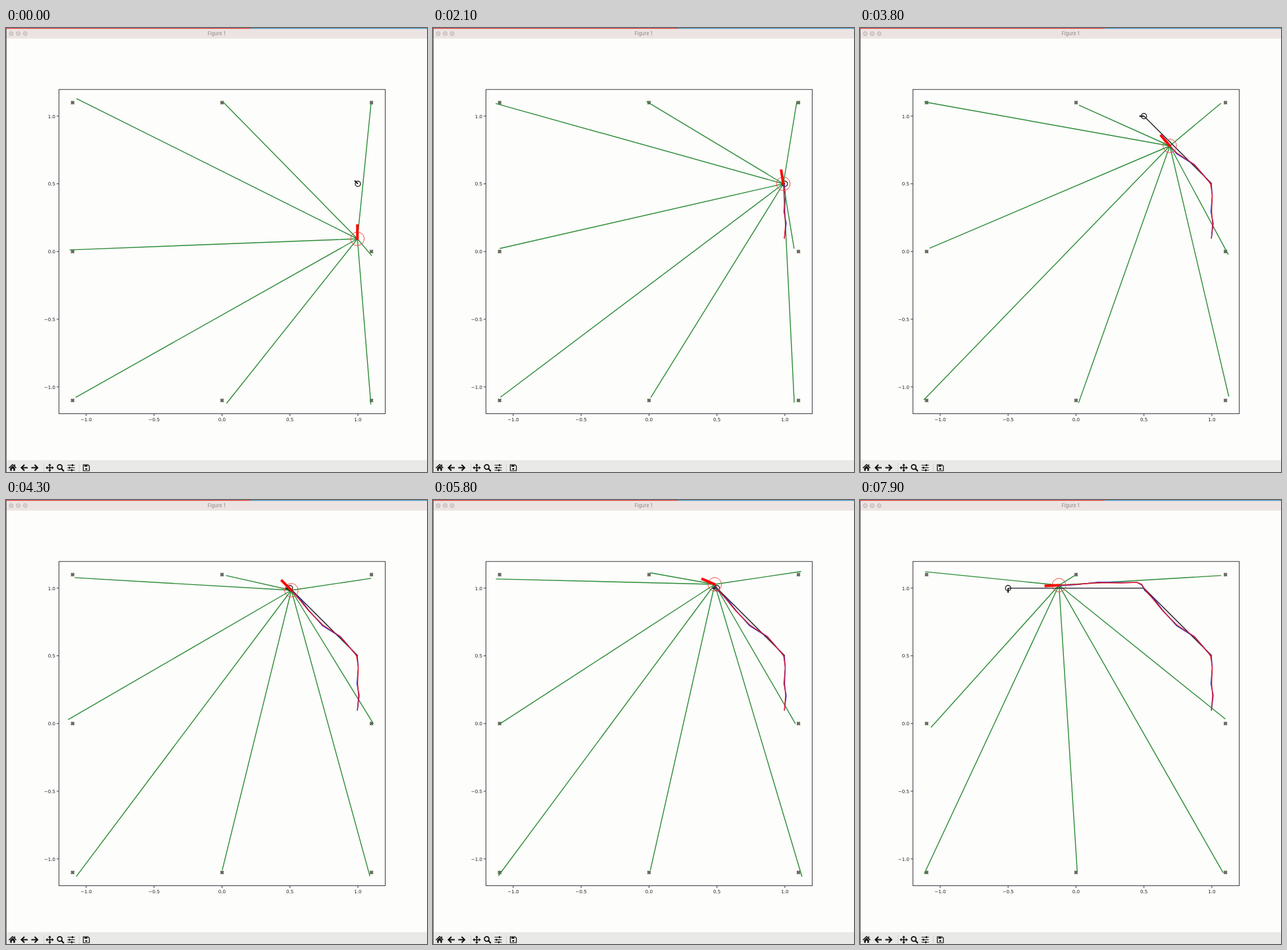
Animation of 640x674 px, one loop 8000 ms. Source, as an HTML page:

```html
<!DOCTYPE html>
<html lang="en">
<head>
<meta charset="utf-8">
<title>Figure 1</title>
<style>
  html, body { margin: 0; width: 100%; height: 100%; overflow: hidden; background: #fdfdfb; }
  svg { display: block; width: 640px; height: 674px; }
  text { font-family: "DejaVu Sans", sans-serif; font-size: 7.1px; fill: #222226; }
  .title { font-family: Inter, sans-serif; font-size: 7.4px; fill: #8b8684; text-anchor: middle; }
  .line { fill: none; stroke-linejoin: round; }
  .icon { fill: none; stroke: #111; stroke-width: 1.8; }
  .solid { fill: #111; stroke: none; }
</style>
</head>
<body>
<svg viewBox="0 0 640 674">
  <rect width="640" height="674" fill="#fdfdfb"/>
  <rect width="640" height="16" fill="#ece4e2"/>
  <rect width="372" height="1.2" fill="#e5403c"/>
  <rect x="372" width="268" height="1.2" fill="#4598c4"/>
  <g fill="#d9d2d0" stroke="#b2abaa" stroke-width=".8">
    <circle cx="8" cy="8.5" r="3"/><circle cx="18.5" cy="8.5" r="3"/><circle cx="29.3" cy="8.5" r="3"/>
  </g>
  <text class="title" x="320" y="10.8">Figure 1</text>

  <rect y="656" width="640" height="18" fill="#e9e9e7"/>
  <path d="M57.5 661V674M111.5 661V674" stroke="#d4d4d2"/>
  <g class="icon">
    <path d="M4.5 668L10 662.7L15.5 668M13.3 662.5V665" stroke-width="1.5"/>
    <path class="solid" d="M6.3 668L10 664.6L13.7 668V672.3H11.2V669H8.8V672.3H6.3Z"/>
    <path d="M33 667.5H23.5M28 663L23.5 667.5L28 672" stroke-width="2.1"/>
    <path d="M38.5 667.5H48M43.5 663L48 667.5L43.5 672" stroke-width="2.1"/>
    <path d="M61.5 667.5H71.5M66.5 662.5V672.5" stroke-width="1.5"/>
    <path class="solid" d="M66.5 661.3l2.4 2.9h-4.8zM66.5 673.7l2.4-2.9h-4.8zM60.3 667.5l2.9-2.4v4.8zM72.7 667.5l-2.9-2.4v4.8z"/>
    <circle cx="81.7" cy="666.3" r="3.5"/>
    <path d="M84.3 669L88 672.7" stroke-width="2.2"/>
    <path d="M93.5 663.7H104.5M93.5 667.5H104.5M93.5 671.3H104.5" stroke-width="1.1"/>
    <path d="M101 662.2v3M96.5 666v3M100 669.8v3" stroke-width="2"/>
    <path d="M117.5 663H124.7L126.7 665V672H117.5Z" stroke-width="1.2"/>
    <path class="solid" d="M119.2 663.2h4.6v2.7h-4.6z"/>
    <circle class="solid" cx="122" cy="669.3" r="1.4"/>
  </g>
  <path d="M.5 1V674" stroke="#756c6e"/>

  <rect x="80.5" y="93.3" width="496" height="492.2" fill="none" stroke="#3c3c46"/>
  <g id="axes"></g>
  <g id="marks"></g>
  <path id="rays" class="line" stroke="#2d8c38" stroke-width="1.4"/>
  <path id="plan" class="line" stroke="#1c1a22" stroke-width="1.3"/>
  <g id="goal" class="line" stroke="#15151a">
    <circle r="4.1" stroke-width="1.2"/><path d="M0 0H7" stroke-width="2"/>
  </g>
  <path id="truth" class="line" stroke="#2a22c4" stroke-width="1.4"/>
  <path id="trail" class="line" stroke="#e0182e" stroke-width="1.4"/>
  <circle id="halo" r="10.3" fill="none" stroke="#f04a48"/>
  <path id="arrow" d="M-1.5 0H22" stroke="#f80a08" stroke-width="4"/>
</svg>
<script>
const $ = id => document.getElementById(id);
const px = x => 328.4 + 206.5 * x;
const py = y => 339.3 - 205.5 * y;

$('axes').innerHTML = [-1, -.5, 0, .5, 1].map(v => {
  const label = v.toFixed(1).replace('-', '\u2212'), x = px(v), y = py(v);
  return `<path d="M${x} 585.5v3.5M80.5 ${y}h-3.5" stroke="#3c3c46"/>
    <text x="${x}" y="596.8" text-anchor="middle">${label}</text>
    <text x="75" y="${y + 2.7}" text-anchor="end">${label}</text>`;
}).join('');

// Landmarks on the border of a 3 x 3 grid
const landmarks = [];
for (const y of [1.1, 0, -1.1])
  for (const x of [-1.1, 0, 1.1])
    if (x || y) landmarks.push([px(x), py(y)]);

$('marks').innerHTML = landmarks.map(([x, y]) =>
  `<rect x="${x - 2.6}" y="${y - 2.6}" width="5.2" height="5.2" fill="#838378"/>
   <path d="M${x - 2.2} ${y - 2.2}l4.4 4.4m0 -4.4l-4.4 4.4" stroke="#4a4a44" stroke-width=".9"/>`).join('');

// Waypoints: x, y, heading in degrees, redraw at which each becomes the goal
const goals = [[1, .5, 135, 0], [.5, 1, 180, 8], [-.5, 1, -90, 14]];

// Bends of the driven route
const route = [
  [534.2, 320], [536, 297], [534.5, 278], [535.5, 254], [533.2, 238], [532, 235],
  [534.3, 237.5], [508, 207], [482, 190], [460, 168], [446, 151], [433.8, 137],
  [428.3, 128], [421, 125], [397.5, 126], [362, 125.5], [330, 128], [302.5, 129.3]
];

// Drive and turn phases: redraw number, position along the route, heading
const phases = [
  [0, 0, 90], [3, 4, 90], [7, 6, 126], [9, 11, 135], [12, 12, 157], [14, 14, 183], [16, 17, 183]
];

const LOOP = 8000, FIRST = 50, PERIOD = 521;

const mix = (a, b, f) => a.map((v, i) => v + (b[i] - v) * f);
const line = pts => 'M' + pts.map(p => p.join(' ')).join('L');
const place = (id, x, y, turn = 0) =>
  $(id).setAttribute('transform', `translate(${x} ${y}) rotate(${-turn})`);

// Seeded sensor error in pixels
const noise = n => {
  const s = Math.sin(n * 12.9898) * 43758.5453;
  return (s - Math.floor(s) - .5) * 14;
};

function draw(n) {
  const next = Math.max(1, phases.findIndex(p => p[0] >= n));
  const a = phases[next - 1], b = phases[next];
  const [, u, heading] = mix(a, b, (n - a[0]) / (b[0] - a[0]));

  const i = Math.floor(u);
  const here = mix(route[i], route[i + 1] || route[i], u - i);
  const driven = [...route.slice(0, i + 1), here];

  $('rays').setAttribute('d', landmarks.map(([x, y], k) => {
    const seed = n * 16 + k * 2 + 1;
    return line([here, [x + noise(seed), y + noise(seed + 1)]]);
  }).join(''));

  const reached = goals.filter(g => g[3] <= n);
  const [gx, gy, turn] = reached[reached.length - 1];
  $('plan').setAttribute('d', line(reached.map(([x, y]) => [px(x), py(y)])));
  place('goal', px(gx), py(gy), turn);

  $('trail').setAttribute('d', line(driven));
  $('truth').setAttribute('d', line(driven.map(([x, y], k) =>
    [x + Math.sin(k * 2.1) * 1.1, y - Math.cos(k * 1.3) * 1.1])));
  place('halo', ...here);
  place('arrow', ...here, heading);
}

let shown = -1;
function tick() {
  const t = performance.now() % LOOP;
  const n = Math.floor((t - FIRST) / PERIOD) + 1;
  if (n !== shown) draw(shown = n);
  requestAnimationFrame(tick);
}
tick();
</script>
</body>
</html>
```
